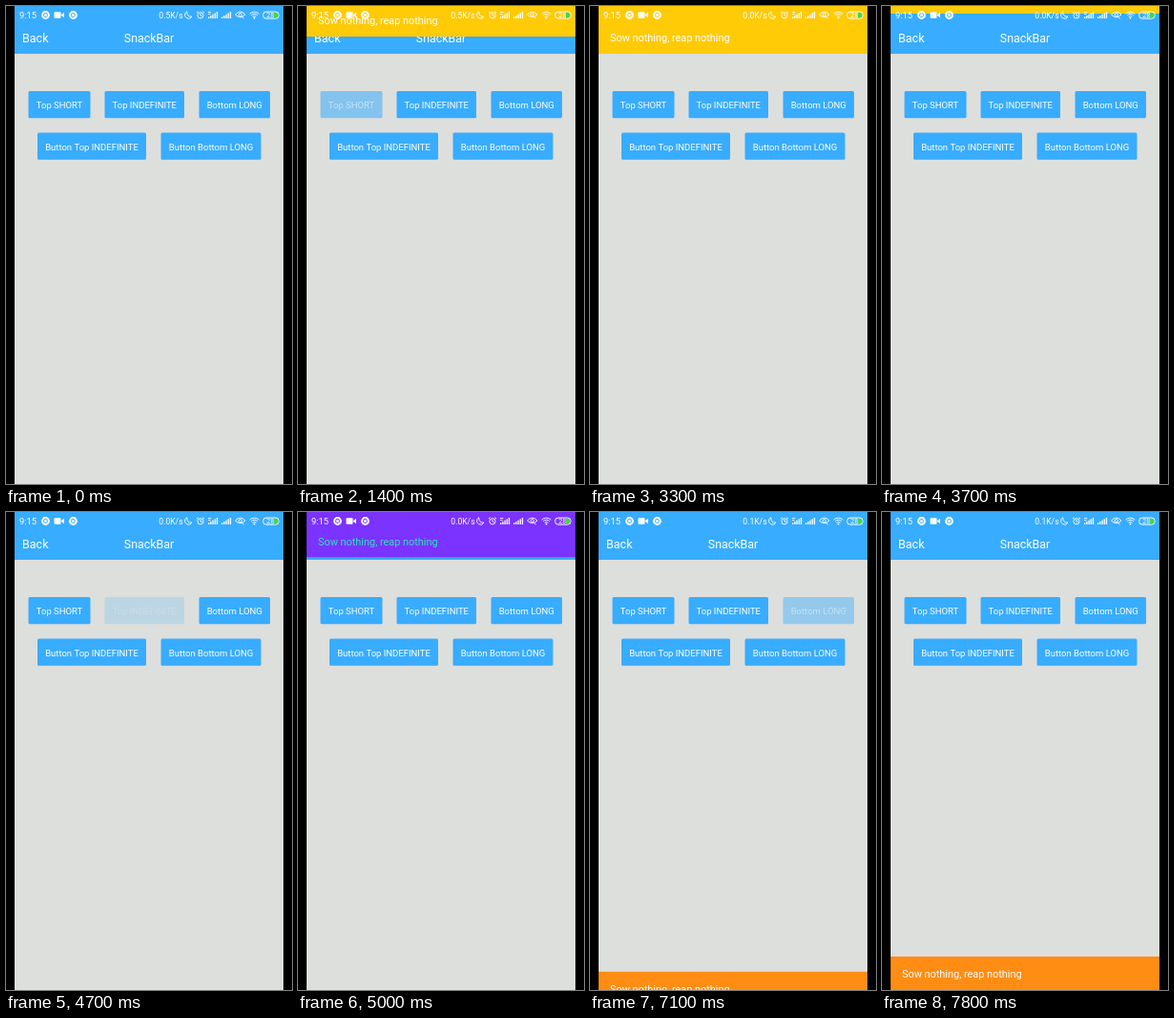
An HTML page with a canvas that plays this animation: 300 px wide and 500 px high, repeating every 8000 ms.

```html
<!DOCTYPE html>
<html lang="en">
<head>
<meta charset="utf-8">
<title>SnackBar</title>
<style>
html, body { margin: 0; width: 100%; height: 100%; overflow: hidden; background: #000; }
canvas { display: block; width: 300px; height: 500px; }
</style>
</head>
<body>
<canvas id="stage"></canvas>
<script>
const W = 300, H = 500, LOOP = 8000;
const LEFT = 9, WIDTH = 282;
const BLUE = '#38acff', GREY = '#dddfdc';
const MESSAGE = 'Sow nothing, reap nothing';

const canvas = document.getElementById('stage');
const ctx = canvas.getContext('2d');
const dpr = window.devicePixelRatio || 1;
canvas.width = W * dpr;
canvas.height = H * dpr;

// press: finger down, release: fade back begins
const buttons = [
  { label: 'Top SHORT', x: 23.5, y: 89, w: 65, press: 1190, release: 1285 },
  { label: 'Top INDEFINITE', x: 103.5, y: 89, w: 83.5, press: 4690, release: 4770 },
  { label: 'Bottom LONG', x: 202.5, y: 89, w: 74.5, press: 6890, release: 7002 },
  { label: 'Button Top INDEFINITE', x: 33, y: 132.5, w: 114 },
  { label: 'Button Bottom LONG', x: 162.5, y: 132.5, w: 105 }
];

const bars = [
  { fill: '#ffca06', ink: '#fff', top: true, show: 1280, hide: 3520, end: 3820 },
  { fill: '#7b33ff', ink: '#2ce5c0', top: true, show: 4770, hide: 7005, end: 7005 },
  { fill: '#ff8d14', ink: '#fff', top: false, show: 7002, hide: 9000, end: 9000 }
];

const clamp = v => Math.max(0, Math.min(1, v));
const easeOut = p => 1 - (1 - p) * (1 - p);
const easeInOut = p => p < 0.5 ? 2 * p * p : 1 - 2 * (1 - p) * (1 - p);

function rect(x, y, w, h, fill) {
  ctx.fillStyle = fill;
  ctx.fillRect(x, y, w, h);
}

function text(str, x, y, size, fill = '#fff', align = 'left') {
  ctx.font = `${size}px Roboto, sans-serif`;
  ctx.textAlign = align;
  ctx.fillStyle = fill;
  ctx.fillText(str, x, y);
}

function roundRect(x, y, w, h, r) {
  ctx.beginPath();
  ctx.roundRect(x, y, w, h, r);
}

function disc(x, y, r) {
  ctx.beginPath();
  ctx.arc(x, y, r, 0, 7);
  ctx.fill();
}

function arc(x, y, r, from, to) {
  ctx.beginPath();
  ctx.arc(x, y, r, from * Math.PI, to * Math.PI);
  ctx.stroke();
}

function line(...p) {
  ctx.beginPath();
  for (let i = 0; i < p.length; i += 2) ctx.lineTo(p[i], p[i + 1]);
  ctx.stroke();
}

function recordDot(x) {
  ctx.lineWidth = 2;
  arc(x, 9.5, 3.4, 0, 2);
  disc(x, 9.5, 1.5);
}

function camera() {
  roundRect(50.5, 6.3, 7, 6.4, 1);
  ctx.fill();
  ctx.beginPath();
  ctx.moveTo(57.5, 9.5);
  ctx.lineTo(61, 6.8);
  ctx.lineTo(61, 12.2);
  ctx.fill();
}

function moon() {
  ctx.beginPath();
  ctx.arc(191.5, 9.3, 3.9, 0.15 * Math.PI, 1.35 * Math.PI);
  ctx.quadraticCurveTo(189.8, 11.6, 195, 11.1);
  ctx.stroke();
}

function alarm() {
  arc(204, 9.8, 3.1, 0, 2);
  line(204, 7.8, 204, 10, 205.6, 10.4);
  line(199.9, 7.2, 201.8, 5.6);
  line(208.1, 7.2, 206.2, 5.6);
}

function signal(x, n) {
  for (let i = 0; i < n; i++) {
    const h = 1.7 + i * 5.3 / (n - 1);
    ctx.fillRect(x + i * 2.2, 13 - h, 1.3, h);
  }
}

function wifi(x) {
  for (const r of [2.6, 4.7, 6.8]) arc(x, 13, r, 1.25, 1.75);
  disc(x, 12.5, 0.9);
}

function eye() {
  ctx.beginPath();
  ctx.moveTo(240.5, 9);
  ctx.quadraticCurveTo(245.7, 3.2, 251, 9);
  ctx.quadraticCurveTo(245.7, 14.3, 240.5, 9);
  ctx.stroke();
  arc(245.7, 9.2, 1.6, 0, 2);
  line(247.2, 11, 249.5, 13);
}

function battery() {
  ctx.lineWidth = 1;
  roundRect(269.7, 6.1, 16.4, 7, 3.2);
  ctx.stroke();
  roundRect(281, 6.8, 4.5, 5.6, [0, 2.5, 2.5, 0]);
  ctx.fillStyle = '#45d64a';
  ctx.fill();
  text('28', 277.2, 12.2, 7, '#fff', 'center');
}

function statusBar(t) {
  const speed = t < 2200 ? '0.5' : t < 6300 ? '0.0' : '0.1';
  ctx.fillStyle = ctx.strokeStyle = '#fff';
  recordDot(41.5);
  camera();
  recordDot(70.5);
  ctx.lineWidth = 0.9;
  moon();
  alarm();
  signal(212, 5);
  ctx.fillRect(212, 6, 3.2, 0.9);
  ctx.fillRect(212, 8, 2.6, 0.8);
  signal(226, 5);
  eye();
  wifi(260.5);
  battery();
  text('9:15', 14, 13, 9.4);
  text(speed + 'K/s', 185.6, 12.9, 8.6, '#fff', 'right');
}

function button(b, t) {
  let alpha = 1;
  if (b.press && t >= b.press) alpha = 0.2 + 0.8 * easeInOut(clamp((t - b.release) / 250));
  ctx.save();
  // label and plate fade as one
  ctx.globalAlpha = alpha;
  ctx.fillStyle = BLUE;
  roundRect(b.x, b.y, b.w, 28.3, 1.5);
  ctx.fill();
  text(b.label, b.x + b.w / 2, b.y + 18.2, 9.5, '#fff', 'center');
  ctx.restore();
}

function snackBar(b, t) {
  if (t < b.show || t >= b.end) return;
  const shown = easeOut(clamp((t - b.show) / 300)) - easeOut(clamp((t - b.hide) / 300));
  const h = b.top ? 50 : 35;
  const y = b.top ? -h * (1 - shown) : H - h * shown;
  rect(LEFT, y, WIDTH, h, b.fill);
  text(MESSAGE, 21, y + (b.top ? 37.4 : 22.2), 10.9, b.ink);
}

function draw(t) {
  ctx.setTransform(dpr, 0, 0, dpr, 0, 0);
  rect(0, 0, W, H, '#000');
  ctx.save();
  ctx.beginPath();
  ctx.rect(LEFT, 0, WIDTH, H);
  ctx.clip();
  rect(LEFT, 0, WIDTH, H, GREY);
  rect(LEFT, 0, WIDTH, 50, BLUE);
  text('Back', 17, 38, 12.5);
  text('SnackBar', 150, 38, 12.4, '#fff', 'center');
  buttons.forEach(b => button(b, t));
  bars.forEach(b => snackBar(b, t));
  statusBar(t);
  ctx.restore();
}

let start;
function tick(now) {
  start ??= now;
  draw((now - start) % LOOP);
  requestAnimationFrame(tick);
}
draw(0);
requestAnimationFrame(tick);
</script>
</body>
</html>
```
